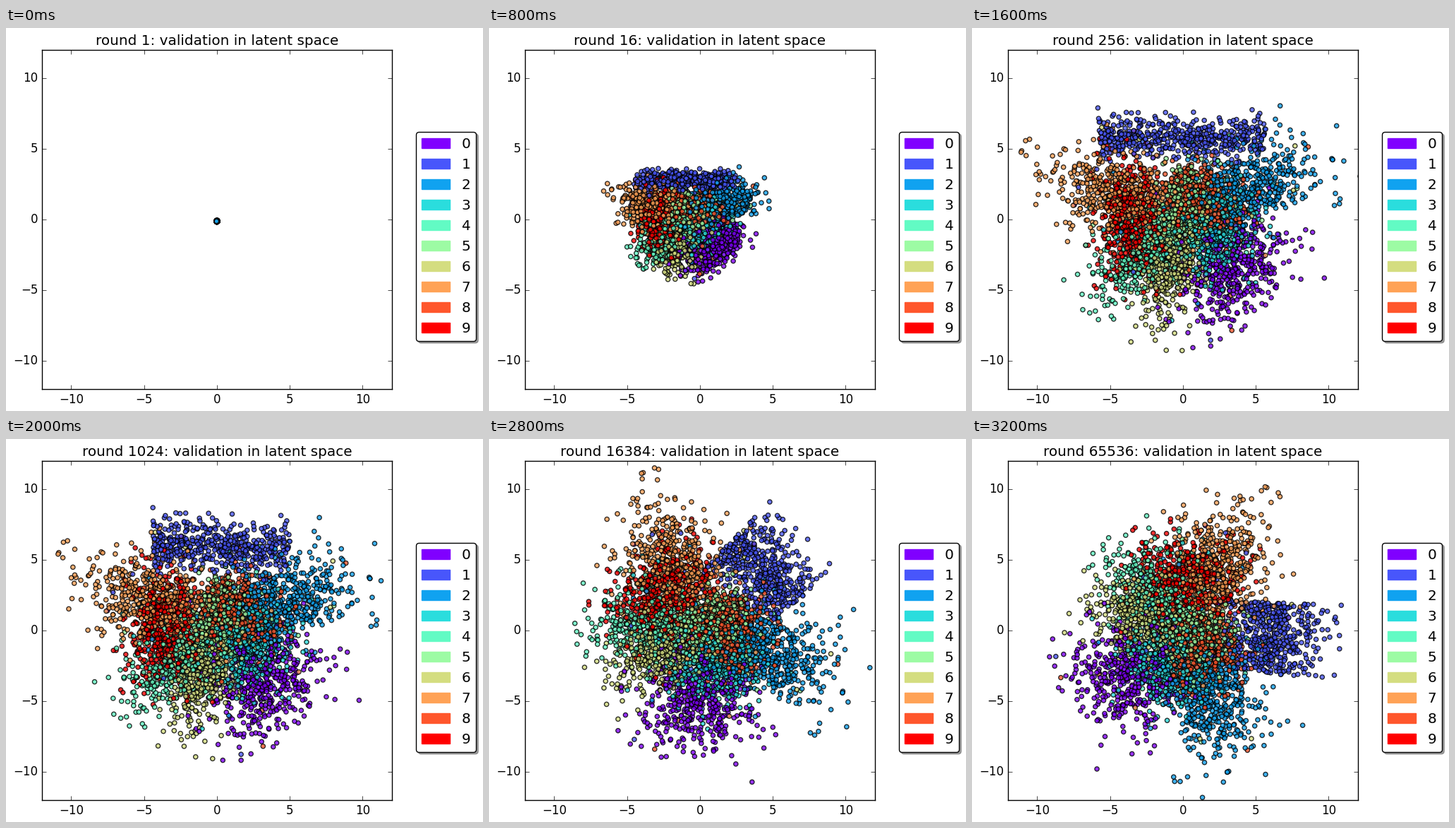
Write a matplotlib script that moves like this. It is 676 by 542 pixels and loops after 3.4 s.

```python
import numpy as np
import matplotlib.pyplot as plt
from matplotlib.animation import FuncAnimation
from matplotlib.patches import Patch

plt.style.use("classic")
plt.rcParams["font.family"] = "DejaVu Sans"

WIDTH, HEIGHT, DPI = 676, 542, 100
FRAMES, INTERVAL = 17, 200
POINTS, CLASSES = 5000, 10
BAND = 1  # the class spread evenly along a band
SETTLED = 8  # frame at which the clusters stop growing and begin to turn

# Each class is a blob around the centre: direction in degrees, distance,
# and how far it widens sideways rather than outwards.
DIRECTION = np.radians([315, 90, 27, 345, 221, 75, 256, 158, 50, 182])
REACH = np.array([4.7, 5.6, 4.6, 2.3, 3.2, 1, 2.7, 4.7, 1.9, 3.4])
WIDEN = np.array([1.2, 3.2, .8, 1.1, .75, .9, .7, .85, 1.1, 1.35])
SIZE = 1 + .15 * REACH

rng = np.random.default_rng(7)
labels = rng.integers(0, CLASSES, POINTS)
labels[-1] = 2
# a few samples land in the cluster of another class
homes = np.where(rng.random(POINTS) < .03,
                 rng.integers(0, CLASSES, POINTS), labels)
outward, sideways = np.clip(rng.normal(size=(2, POINTS)), -2.7, 2.7)
in_band = homes == BAND
sideways[in_band] = rng.uniform(-.88, .88, in_band.sum())
drag = rng.uniform(-7.4, 0, POINTS)


def positions(frame):
    grow = frame**5 / (frame**5 + 4**5)
    late = max(frame - SETTLED, 0) / (FRAMES - 1 - SETTLED)
    angle = DIRECTION[homes] - np.radians(95) * late**2.5
    widen = WIDEN[homes] ** (1 - .7 * late)

    size = grow * SIZE[homes] + .015 * (1 + frame * (1 - grow))
    along = grow * REACH[homes] + outward * size / widen
    across = sideways * size * widen
    x = along * np.cos(angle) - across * np.sin(angle)
    y = along * np.sin(angle) + across * np.cos(angle)

    # the fringe thins out more than the core
    fringe = 1 + .15 * (x**2 + y**2) / 64
    # early on the cloud is briefly drawn out to the left
    streak = np.exp(-(frame - 3)**2 / .7)
    return np.column_stack([x * fringe + drag * streak,
                            y * fringe - .12 * (1 - late)])


cmap = plt.get_cmap("rainbow")
colors = cmap(np.arange(CLASSES) / (CLASSES - 1))
fig = plt.figure(figsize=(WIDTH / DPI, HEIGHT / DPI), dpi=DPI,
                 facecolor="white")
ax = fig.add_axes([51.1 / WIDTH, 31 / HEIGHT, 495.6 / WIDTH, 480 / HEIGHT])
dots = ax.scatter(*positions(0).T, s=20, c=colors[labels],
                  edgecolors="black", linewidths=1, alpha=.8)
ax.set(xlim=(-12, 12), ylim=(-12, 12),
       xticks=range(-10, 11, 5), yticks=range(-10, 11, 5))
title = ax.set_title("", y=1.0)
swatches = [Patch(color=color, label=str(i)) for i, color in enumerate(colors)]
ax.legend(handles=swatches, loc="center left", bbox_to_anchor=(1.05, .45),
          fancybox=True, shadow=True)


def draw(frame):
    dots.set_offsets(positions(frame))
    title.set_text(f"round {2**frame}: validation in latent space")
    return dots, title


anim = FuncAnimation(fig, draw, frames=FRAMES, interval=INTERVAL,
                     repeat=True, repeat_delay=0, blit=False)
plt.show()
```
